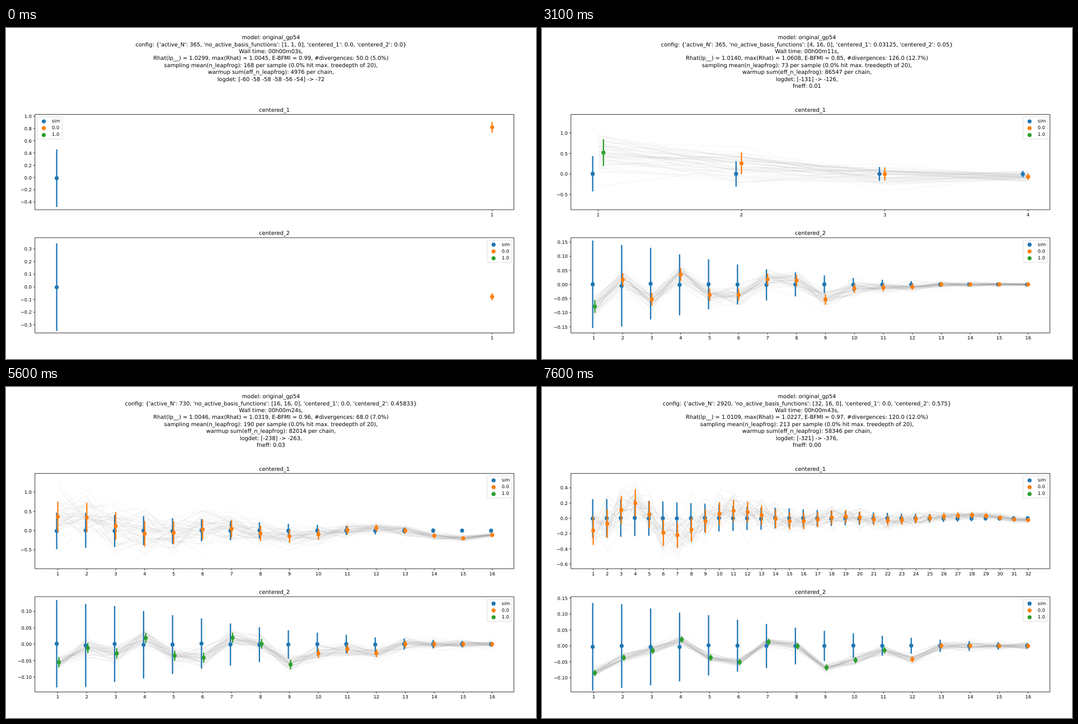
An HTML page for the animation above (8000 ms loop, 947 px wide and 592 px high).

```html
<!DOCTYPE html>
<html>
<head>
<meta charset="utf-8">
<style>
html, body { margin: 0; width: 100%; height: 100%; overflow: hidden; background: #fff; }
svg { display: block; width: 100%; height: 100%; }
text { font-family: "DejaVu Sans", sans-serif; font-size: 8.22px; fill: #000; white-space: pre; text-rendering: geometricPrecision; }
.big { font-size: 9.86px; text-anchor: middle; }
.mid { text-anchor: middle; }
.end { text-anchor: end; }
.axis { fill: none; stroke: #000; stroke-width: .8; }
.draw { fill: none; stroke: #808080; stroke-opacity: .075; stroke-width: 1.2; stroke-linejoin: round; }
</style>
</head>
<body>
<svg id="stage" viewBox="0 0 947 592" xmlns="http://www.w3.org/2000/svg"></svg>
<script>
const BLUE = '#1f77b4', ORANGE = '#ff7f0e', GREEN = '#2ca02c';
const LEFT = 51.7, RIGHT = 907.6, HEIGHT = 170.4, TOPS = [154.6, 375];
const SHIFT = 0.0375, DRAWS = 50, STATES = 17;
const stage = document.getElementById('stage');

const px = v => +v.toFixed(2);
const lerp = (a, b, t) => a + (b - a) * t;
const clamp = (v, lo, hi) => Math.min(hi, Math.max(lo, v));
const text = (x, y, s, cls = '') => `<text x="${px(x)}" y="${px(y)}" class="${cls}">${s}</text>`;
const dot = (x, y, c) => `<circle cx="${px(x)}" cy="${px(y)}" r="3.6" fill="${c}"/>`;
const marker = (x, y, r, c) =>
  `<path d="M${px(x)} ${px(y - r)}V${px(y + r)}" stroke="${c}" stroke-width="2.3"/>` + dot(x, y, c);

function normals(seed) {
  const rnd = () => {
    seed = (seed + 0x6D2B79F5) | 0;
    let t = Math.imul(seed ^ (seed >>> 15), 1 | seed);
    t = (t + Math.imul(t ^ (t >>> 7), 61 | t)) ^ t;
    return ((t ^ (t >>> 14)) >>> 0) / 4294967296;
  };
  return () => Math.sqrt(-2 * Math.log(1 - rnd())) * Math.cos(2 * Math.PI * rnd());
}

// smooth curve through its turning points [x, y]
const bends = (...pts) => x => {
  const j = pts.findIndex(p => p[0] >= x);
  if (j <= 0) return pts[j ? pts.length - 1 : 0][1];
  const [x0, y0] = pts[j - 1], [x1, y1] = pts[j];
  return lerp(y0, y1, (1 - Math.cos(Math.PI * (x - x0) / (x1 - x0))) / 2);
};
const list = (...ys) => x => ys[x - 1] || 0;

const lowA = list(-.078, .017, -.052, .035, -.037, -.037, .018, .014, -.053, -.014, -.011, -.008);
const lowB = list(-.043, -.026, -.016, .011, -.034, -.043, .021, -.005, -.066, -.035, -.016, -.037);
const lowC = list(-.085, -.037, -.015, .02, -.037, -.051, .012, -.001, -.068, -.045, -.014, -.042);
const upA = bends([1, .82], [2, .3]);
const upB = bends([1, .52], [3, 0], [4, -.065]);
const upC = bends([1, .52], [4.6, -.4], [9, .01], [16, 0]);
const upD = bends([1, .28], [2, .33], [4, .05], [6.4, .21], [9, -.23], [12, .1], [15, -.3], [16, -.17], [18, 0]);
const upE = bends([1, -.16], [4, .2], [6.5, -.23], [11, .1], [15.5, -.04], [19, .024], [22, -.027], [28, .04], [32, -.022]);

// zero: y of value 0, unit: pixels per 1, greens: leading centered points
const panel = (mean, zero, unit, amp, decay, noise, greens) =>
  ({ mean, nums: [zero, unit, amp, decay, noise, greens] });
const keys = [];
const key = (at, upper, lower, ...stats) => keys.push({ at, upper, lower, stats });

// stats: c1, c2, seconds, Rhat, max Rhat, E-BFMI, divergences, %, leapfrogs, warmup, logdet, next, fneff
key(0, panel(upA, 267.4, 109.5, .47, .33, .09, 0), panel(lowA, 463, 226.3, .346, 0, .028, 0),
  0, 0, 3, 1.0299, 1.0045, .99, 50, 5, 168, 4976, -60, -72, .01);
key(2, panel(upA, 267.4, 104, .48, .33, .08, 1), panel(lowA, 460.7, 297.5, .252, 0, .024, 1),
  .03125, .05, 5, 1.0006, 1.0079, .98, 67, 6.7, 63, 37108, -80, -92, .01);
key(5, panel(upA, 265.5, 104.3, .49, .33, .076, 1), panel(lowA, 458.5, 480, .164, .073, .023, 1),
  .03125, .05, 8, 1.0125, 1.0055, .83, 4, .4, 22, 67459, -114, -131, .01);
key(7, panel(upB, 261.2, 73.6, .43, .33, .5, 1), panel(lowA, 458.7, 505, .155, .07, .023, 1),
  .03125, .05, 11, 1.014, 1.0608, .85, 126, 12.7, 73, 86547, -131, -126, .01);
key(10, panel(upC, 255, 59, .52, .09, 1, 0), panel(lowA, 453.6, 625, .1235, .051, .022, 8),
  0, .375, 17, 1.0022, 1.0252, .91, 63, 6.9, 85, 136685, -197, -198, .09);
key(13, panel(upD, 257.8, 73.8, .45, .021, .55, 0), panel(lowB, 463.3, 568, .138, .049, .0125, 10),
  0, .5, 28, 1.0058, 1.0353, .99, 71, 7.1, 242, 54678, -258, -296, 0);
key(16, panel(upE, 234.9, 136.3, .255, .0135, .28, 0), panel(lowC, 463, 569, .138, .047, .01, 11),
  0, .575, 43, 1.0109, 1.0227, .97, 120, 12, 213, 58346, -321, -376, 0);

const blend = (a, b, t) => a.map((v, i) => lerp(v, b[i], t));
const blendPanel = (a, b, t) =>
  panel(x => lerp(a.mean(x), b.mean(x), t), ...blend(a.nums, b.nums, t));

function legend(top, onLeft) {
  const x = onLeft ? 55.7 : 859.4, y = top + 4.4;
  const rows = [['sim', BLUE], ['0.0', ORANGE], ['1.0', GREEN]];
  return `<rect x="${x}" y="${px(y)}" width="44.8" height="39.6" rx="1.7" fill="#fff" fill-opacity=".8" stroke="#ccc" stroke-opacity=".8" stroke-width=".8"/>` +
    rows.map(([s, c], i) => dot(x + 11.8, y + 8 + i * 12.2, c) + text(x + 26.4, y + 10.2 + i * 12.1, s)).join('');
}

function drawPanel(p, n, row, seed) {
  const [zero, unit, amp, decay, noise, centered] = p.nums;
  const top = TOPS[row], bottom = top + HEIGHT, greens = Math.round(centered);
  const first = 1 - SHIFT, last = n + (greens >= n ? SHIFT : 0);
  const X = v => lerp(90.6, 868.7, (v - first) / (last - first));
  const Y = v => zero - v * unit;
  const prior = i => amp * Math.exp(-decay * (i - 1) ** 1.5);
  const spread = i => 1 / Math.hypot(1 / prior(i), 1 / noise);
  const gauss = normals(seed);
  const terms = Array.from({ length: n }, (_, i) => i + 1);
  let out = '', ticks = '';

  for (let k = 0; k < DRAWS && n > 1; k++) {
    const pts = terms.map(i => px(X(i)) + ' ' + px(Y(p.mean(i) + 0.85 * spread(i) * gauss())));
    out += `<path class="draw" d="M${pts.join('L')}"/>`;
  }
  out = `<g clip-path="url(#clip${row})">${out}</g>`;

  for (const i of terms)
    out += marker(X(i - SHIFT), Y(0.02 * prior(i) * gauss()), prior(i) * unit, BLUE);
  for (const i of terms) {
    const green = i <= greens;
    out += marker(X(i + (green ? SHIFT : 0)), Y(p.mean(i)), spread(i) * unit, green ? GREEN : ORANGE);
    ticks += `M${px(X(i))} ${bottom}v2.9`;
    out += text(X(i), bottom + 11.8, i, 'mid');
  }

  const step = [.05, .1, .2, .25, .5].find(s => HEIGHT / unit / s <= 9);
  const digits = Number.isInteger(step * 10) ? 1 : 2;
  for (let j = -12; j <= 12; j++) {
    const y = Y(j * step);
    if (y < top || y > bottom) continue;
    ticks += `M${LEFT} ${px(y)}h-2.9`;
    out += text(45.9, y + 3.1, (j < 0 ? '\u2212' : '') + Math.abs(j * step).toFixed(digits), 'end');
  }
  return out + `<path class="axis" d="${ticks}M${LEFT} ${top}H${RIGHT}V${bottom}H${LEFT}Z"/>` +
    text(479.6, top - 5, 'centered_' + (row + 1), 'big') + legend(top, row === 0 && n === 1);
}

function header(i, n1, n2, stats) {
  const [c1, c2, sec, rhat, rmax, bfmi, div, pct, leap, warm, det, next, fneff] = stats;
  const size = 365 * 2 ** Math.max(0, Math.floor((i - 9) / 2));
  const ratio = v => v ? String(+v.toFixed(5)) : '0.0';
  const lines = [
    'model: original_gp54',
    `config: {'active_N': ${size}, 'no_active_basis_functions': [${n1}, ${n2}, 0], 'centered_1': ${ratio(c1)}, 'centered_2': ${ratio(c2)}}`,
    `Wall time: 00h00m${sec.toFixed(0).padStart(2, '0')}s,`,
    `Rhat(lp__) = ${rhat.toFixed(4)}, max(Rhat) = ${rmax.toFixed(4)}, E-BFMI = ${bfmi.toFixed(2)}, #divergences: ${div.toFixed(0)}.0 (${pct.toFixed(1)}%)`,
    `sampling mean(n_leapfrog): ${leap.toFixed(0)} per sample (0.0% hit max. treedepth of 20),`,
    `warmup sum(eff_n_leapfrog): ${warm.toFixed(0)} per chain,`
  ];
  if (i) lines.push(`logdet: [${det.toFixed(0)}] -&gt; ${next.toFixed(0)},`, `fneff: ${fneff.toFixed(2)}`);
  else lines.push('logdet: [-60 -58 -58 -58 -56 -54] -&gt; -72');
  return lines.map((s, k) => text(473.4, 20.2 + k * 12.42, s, 'big')).join('');
}

function drawState(i) {
  const j = Math.max(1, keys.findIndex(k => k.at >= i));
  const a = keys[j - 1], b = keys[j], t = (i - a.at) / (b.at - a.at);
  const n1 = i > 14 ? 32 : clamp(2 ** (i - 5), 1, 16);
  const n2 = clamp(2 ** (i - 1), 1, 16);
  return header(i, n1, n2, blend(a.stats, b.stats, t)) +
    drawPanel(blendPanel(a.upper, b.upper, t), n1, 0, i * 97 + 11) +
    drawPanel(blendPanel(a.lower, b.lower, t), n2, 1, i * 97 + 61);
}

const states = Array.from({ length: STATES }, (_, i) => drawState(i));
const clips = TOPS.map((y, i) =>
  `<clipPath id="clip${i}"><rect x="${LEFT}" y="${y}" width="${RIGHT - LEFT}" height="${HEIGHT}"/></clipPath>`);
stage.innerHTML = `<defs>${clips.join('')}</defs><g id="plot"></g>`;
const plot = document.getElementById('plot');
const start = performance.now();
let shown = -1;

function render(now) {
  const t = Math.max(0, now - start) % 8000;
  const i = t < 100 ? 0 : 1 + Math.floor((t - 100) / 500);
  if (i !== shown) plot.innerHTML = states[shown = i];
}
function loop(now) {
  render(now);
  requestAnimationFrame(loop);
}
render(start);
requestAnimationFrame(loop);
</script>
</body>
</html>
```
